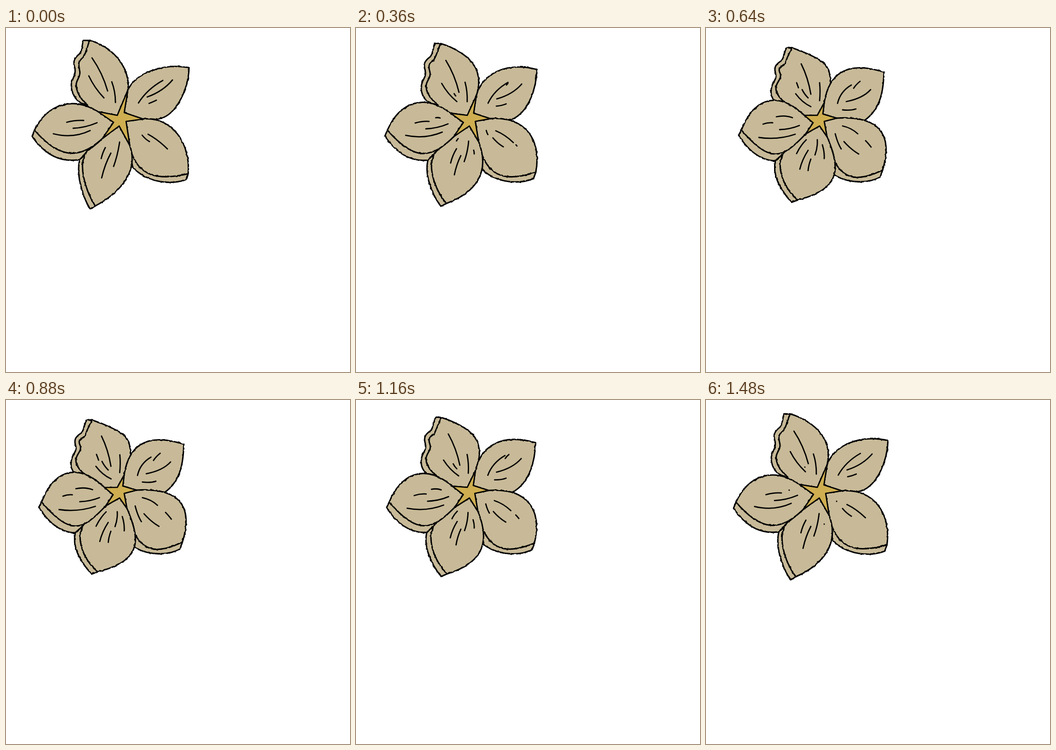
An HTML page for the animation above (1.52 s loop, 748 px wide and 748 px high).

```html
<!DOCTYPE html>
<html>
<head>
<meta charset="utf-8">
<style>
html, body { margin: 0; width: 100%; height: 100%; overflow: hidden; background: #fff; }
svg { display: block; width: 100vw; height: 100vh; }
path { stroke: #000; stroke-width: 3.1; stroke-linejoin: round; stroke-linecap: round; }
#sides, #faces { fill: #c8ba98; }
#star { fill: #ceae50; }
#star path { stroke-width: 2.7; }
#veins { fill: none; }
#veins path { stroke-width: 2.8; }
</style>
</head>
<body>
<svg viewBox="0 0 748 748">
  <filter id="rough" filterUnits="userSpaceOnUse" x="0" y="0" width="748" height="748" color-interpolation-filters="sRGB">
    <feTurbulence type="fractalNoise" baseFrequency=".15" numOctaves="2" seed="4"/>
    <feDisplacementMap in="SourceGraphic" scale="3" xChannelSelector="R" yChannelSelector="G"/>
  </filter>
  <g filter="url(#rough)"><g id="sides"></g><g id="faces"></g></g>
  <g id="star"></g><g id="veins"></g>
</svg>
<script>
const LOOP = 1520, STEP = 40;
const shapes = [];

// A path that morphs from its open to its closed form, appearing at closure `from`
function add(layer, open, closed, from = 0) {
  const el = document.createElementNS('http://www.w3.org/2000/svg', 'path');
  document.getElementById(layer).append(el);
  shapes.push({ el, open, target: closed.match(/\d+/g).map(Number), from });
}

function petal(side, face, veins) {
  add('sides', ...side);
  add('faces', ...face);
  veins.forEach(v => add('veins', ...v));
}

// Top
petal(
  ['M182 27L168 27C165 40 166 48 160 56C148 66 145 72 150 88C152 104 145 106 142 122C141 140 152 160 168 165L200 181Z',
   'M187 43L176 42C169 54 170 64 164 71C150 80 148 86 151 98C156 112 143 118 142 132C140 145 143 152 147 156L214 190Z'],
  ['M242 190L200 182C172 170 150 142 153 120C155 110 163 105 160 92C155 70 162 70 168 63C176 52 176 40 182 27C211 35 233 52 248 72C262 92 268 115 265 135Z',
   'M242 190L214 190C180 170 152 152 152 131C152 117 166 112 161 98C154 84 168 84 172 76C177 64 180 56 187 43C215 52 246 67 257 77C275 97 275 125 257 163Z'],
  [['M187 65Q210 98 221 137', 'M207 78Q222 108 228 144'],
   ['M180 104Q192 130 213 152', 'M195 143Q209 162 228 171'],
   ['M230 117Q238 138 238 162', 'M247 119Q249 138 247 158'],
   ['M215 146Q215 146 215 146', 'M209 134Q214 144 222 152', .2],
   ['M199 124Q199 124 199 124', 'M197 119Q199 124 201 130', .8]]);

// Right, seen without its edge
add('faces',
  'M257 184L265 135C282 98 340 76 398 86C397 130 372 188 335 197C320 199 308 198 298 198Z',
  'M254 187L257 163C266 105 300 68 387 96C386 125 384 175 343 202C320 200 300 199 284 196Z');
[['M288 163Q307 133 341 114', 'M286 164Q292 138 316 124'],
 ['M307 150Q341 138 362 113', 'M305 160Q341 153 358 134'],
 ['M311 164Q319 161 327 157', 'M297 178Q314 180 326 176'],
 ['M329 122Q329 122 329 122', 'M321 131Q327 122 335 116', .25]
].forEach(v => add('veins', ...v));

// Lower right
petal(
  ['M396 317L391 330C355 342 305 335 276 303L268 270Z',
   'M384 309L379 324C350 340 305 337 277 318L270 280Z'],
  ['M261 203L298 198C360 192 402 250 396 317C340 330 283 330 269 255Z',
   'M257 203L284 196C375 190 408 230 384 309C335 332 282 345 263 236Z'],
  [['M296 233Q303 242 312 247', 'M300 247Q315 264 332 274'],
   ['M309 231Q331 243 351 263', 'M297 213Q316 217 330 230'],
   ['M284 220Q284 220 284 220', 'M281 230Q286 250 294 263', .2],
   ['M348 256Q348 256 348 256', 'M347 245Q353 251 359 259', .3]]);

// Bottom
petal(
  ['M194 387L183 394C164 362 152 315 161 284L185 260Z',
   'M200 374L186 379C160 350 144 318 151 288L170 270Z'],
  ['M246 213L269 255C292 320 235 365 194 387C172 352 155 295 176 268C190 258 200 250 210 240Z',
   'M247 213L263 236C295 310 290 350 200 374C168 350 145 290 176 265C192 250 205 240 217 230Z'],
  [['M216 260Q210 271 207 284', 'M222 266Q209 286 204 307'],
   ['M247 248Q243 276 234 301', 'M242 243Q243 260 237 276'],
   ['M228 272Q215 296 208 326', 'M228 285Q223 298 222 310'],
   ['M257 270Q257 270 257 270', 'M253 254Q258 270 257 284', .2],
   ['M223 240Q223 240 223 240', 'M218 243Q205 256 197 273', .3]]);

// Left
petal(
  ['M62 222L57 236C82 272 115 294 160 286L185 262Z',
   'M77 222L71 233C90 265 118 288 150 289L170 272Z'],
  ['M234 205L210 240C165 282 120 290 62 222C90 165 145 148 200 182Z',
   'M233 206L217 230C165 285 140 295 77 222C100 160 150 130 214 190Z'],
  [['M132 205Q150 200 169 201', 'M124 209Q135 205 145 206'],
   ['M146 218Q172 217 198 206', 'M160 221Q184 220 203 212'],
   ['M103 230Q145 241 183 223', 'M115 238Q156 244 194 231'],
   ['M181 196Q181 196 181 196', 'M153 193Q172 189 188 195', .2]]);

add('star',
  'M265 135L257 184L298 198L261 203L269 255L246 213L210 240L234 205L200 182L242 190Z',
  'M257 163L254 187L284 196L257 203L263 236L247 213L217 230L233 206L214 190L242 190Z');

// [time, closure]: closes, lingers, reopens part way, then snaps fully open
const beats = [[0, 0], [240, .21], [480, .63], [560, .83], [640, 1], [760, 1.09],
  [880, 1.03], [1040, .86], [1120, .8], [1280, .33], [1400, .23], [1480, .21]];

function closure(t) {
  const i = beats.findIndex(b => b[0] >= t);
  if (i === 0) return beats[0][1];
  const [t0, a] = beats[i - 1], [t1, b] = beats[i];
  return a + (b - a) * (t - t0) / (t1 - t0);
}

function morph({ open, target }, q) {
  let i = 0;
  return open.replace(/\d+/g, n => (+n + (target[i++] - n) * q).toFixed(2));
}

function draw() {
  const p = closure(Math.floor(performance.now() % LOOP / STEP) * STEP);
  for (const s of shapes) {
    const q = (p - s.from) / (1 - s.from);
    s.el.setAttribute('d', q < 0 ? '' : morph(s, q));
  }
  requestAnimationFrame(draw);
}
draw();
</script>
</body>
</html>
```
